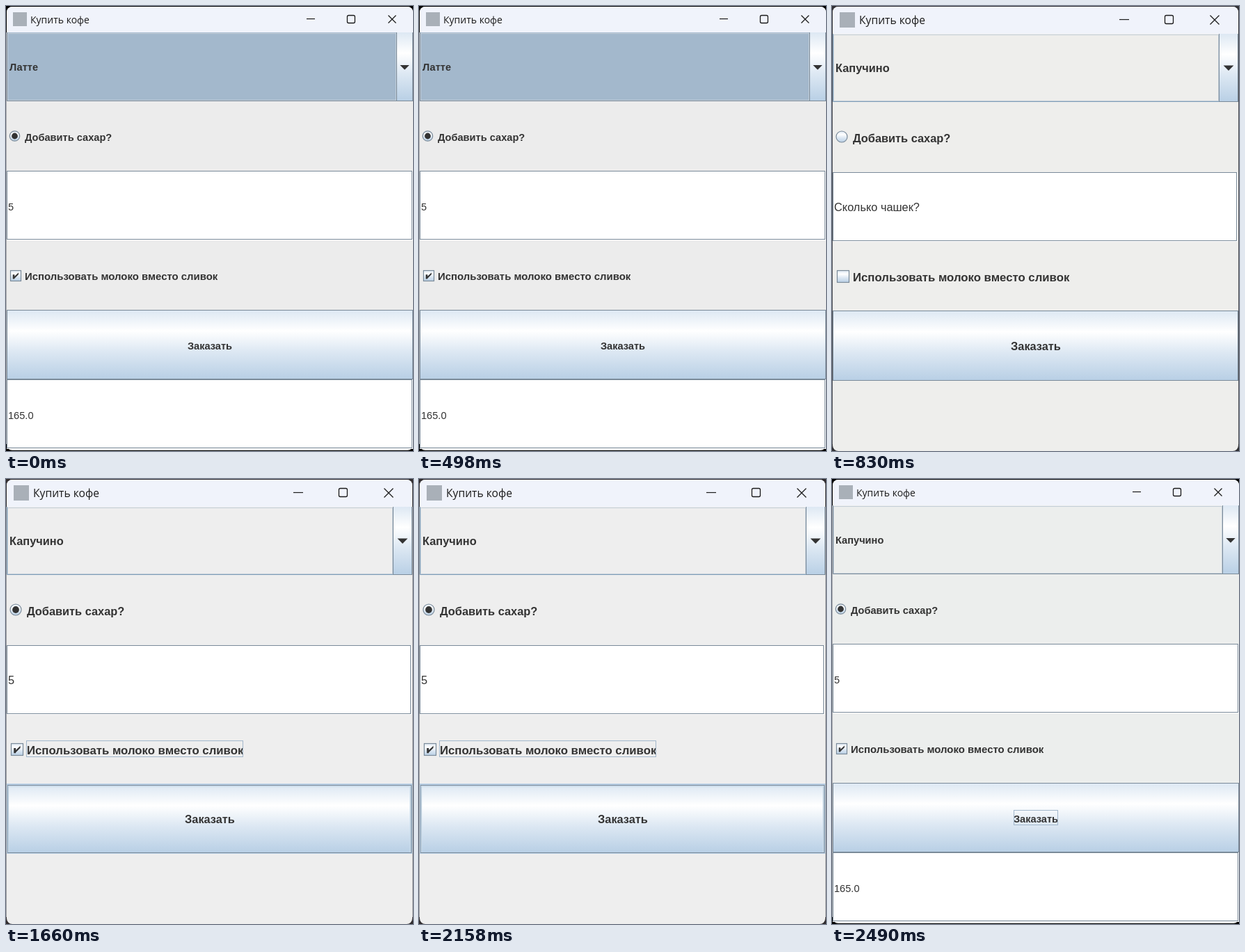
An HTML page that plays this animation: 585 by 640 pixels, repeating every 3.32 s.

```html
<!DOCTYPE html>
<html lang="ru">
<head>
<meta charset="utf-8">
<title>Купить кофе</title>
<style>
html, body { margin: 0; width: 100%; height: 100%; overflow: hidden; background: #000; }
svg { display: block; width: 585px; height: 640px; }
text { font-family: "Liberation Sans", Arial, sans-serif; fill: #333; white-space: pre; }
.bold { font-weight: 700; }
.title { font-family: "Open Sans", "Noto Sans", sans-serif; fill: #1b1b1b; }
.view { visibility: hidden; animation: show 3320ms step-end infinite; }
@keyframes show { 0% { visibility: visible; } 25%, 100% { visibility: hidden; } }
</style>
</head>
<body>
<svg id="stage" viewBox="0 0 585 640">
  <defs>
    <linearGradient id="metal" x1="0" y1="0" x2="0" y2="1">
      <stop offset="0" stop-color="#dde8f3"/>
      <stop offset=".3" stop-color="#fff"/>
      <stop offset=".6" stop-color="#dde8f3"/>
      <stop offset="1" stop-color="#b8cfe5"/>
    </linearGradient>
  </defs>
</svg>
<script>
const EDGE = '#7a8a99', DARK = '#333', METAL = 'url(#metal)';

// Two window sizes: a wide one and a slightly enlarged one.
const WIDE = {
  font: 14.6, longFont: 14.93, title: [35, 24.5, 14], bar: 38, right: 585, bottom: 639,
  icon: [10, 9, 20], min: [432, 444, 18.5], max: [490.5, 13.5, 11], close: [549.5, 13.5, 11],
  combo: [1, 38, 584, 99], split: 561, arrow: [573, 85, 6.7], line: EDGE,
  field: [1, 237, 583, 99], total: [1, 537, 583, 99], button: [1, 437, 584, 100],
  radio: [12.5, 187, 7.2], box: [6, 380, 15], textX: 27, middle: 293,
  lines: [93, 194, 294, 394, 494, 594]
};
const ZOOM = {
  font: 16.35, longFont: 16.75, title: [39, 26, 15.65], bar: 40, right: 584, bottom: 640,
  icon: [11, 9, 22], min: [413, 427, 19.5], max: [478.5, 13.5, 12], close: [543.5, 13.5, 13],
  combo: [1, 40, 583, 98], split: 556, arrow: [570, 85.5, 7.4], line: '#7f9db9',
  field: [1, 239, 581, 99], button: [1, 438, 583, 101],
  radio: [14, 188, 8], box: [7, 380, 17], textX: 30, middle: 293,
  lines: [95, 195.5, 295, 395.5, 495]
};

const ORDERED = { ...WIDE, sugar: true, milk: true, cups: '5', sum: '165.0' };
const views = [
  { ...ORDERED, drink: 'Латте', body: '#ececec', desk: '#000', side: '#aaacb0', pick: '#a3b8cc' },
  { ...ZOOM, drink: 'Капучино', cups: 'Сколько чашек?', body: '#eeeeec', desk: '#303034', side: '#505258' },
  { ...ZOOM, drink: 'Капучино', cups: '5', sugar: true, milk: true, hover: true,
    focus: [29.5, 376.5, 311, 23], body: '#eee', desk: '#302c2e', side: '#9a9ca0' },
  { ...ORDERED, drink: 'Капучино', body: '#eceeed', desk: '#000', side: '#aaacb0',
    focus: [261.5, 476.5, 63, 21] }
];

const rect = (x, y, w, h, fill, more = '') =>
  `<rect x="${x}" y="${y}" width="${w}" height="${h}" fill="${fill}" ${more}/>`;
const frame = (x, y, w, h, fill, stroke) =>
  rect(x + .5, y + .5, w - 1, h - 1, fill, `stroke="${stroke}"`);
const path = (d, stroke, width = 1) =>
  `<path d="${d}" fill="none" stroke="${stroke}" stroke-width="${width}"/>`;
const text = (s, x, y, size, cls = '', more = '') =>
  `<text class="${cls}" x="${x}" y="${y}" font-size="${size}" ${more}>${s}</text>`;

function titleBar(v) {
  const [ix, iy, is] = v.icon, [m0, m1, my] = v.min, [bx, by, bs] = v.max, [cx, cy, cs] = v.close;
  return rect(1, 1, v.right - 1, v.bottom - 1, v.body, 'rx="8"')
    + `<path d="M1 ${v.bar}V9a8 8 0 0 1 8-8H${v.right - 8}a8 8 0 0 1 8 8V${v.bar}z" fill="#f0f3fb"/>`
    + rect(ix, iy, is, is, '#a9b0b8')
    + text('Купить кофе', ...v.title, 'title')
    + path(`M${m0} ${my}H${m1}`, '#1b1b1b', 1.2)
    + rect(bx, by, bs, bs, 'none', 'rx="2" stroke="#1b1b1b" stroke-width="1.3"')
    + path(`M${cx} ${cy}l${cs} ${cs}m0 ${-cs}l${-cs} ${cs}`, '#1b1b1b', 1.3);
}

function combo(v) {
  const [x, y, w, h] = v.combo, [ax, ay, r] = v.arrow;
  const end = x + w, base = y + h - .5;
  return rect(x, y, w, h, v.pick || v.body)
    + frame(x + 1, y + 1, v.split - x - 1, h - 2, 'none', '#c3ced8')
    + rect(v.split, y, end - v.split, h, METAL)
    + path(`M${x + .5} ${y}V${base}H${end}`, v.line)
    + path(`M${v.split + .5} ${y}V${base}H${end - .5}V${y}`, EDGE)
    + `<path d="M${ax - r} ${ay}h${2 * r}l${-r} ${r}z" fill="${DARK}"/>`
    + text(v.drink, 5, v.lines[0], v.font, 'bold');
}

function field([x, y, w, h], s, base, size) {
  return rect(x, y, w + 1, h + 1, '#fff') + frame(x, y, w, h, '#fff', EDGE) + text(s, 3, base, size);
}

function radio(v) {
  const [x, y, r] = v.radio;
  return `<circle cx="${x}" cy="${y}" r="${r}" fill="${METAL}" stroke="${EDGE}" stroke-width="1.2"/>`
    + (v.sugar ? `<circle cx="${x}" cy="${y}" r="${r * .61}" fill="${DARK}"/>` : '')
    + text('Добавить сахар?', v.textX, v.lines[1], v.font, 'bold');
}

function check(v) {
  const [x, y, s] = v.box, k = s / 12;
  const mark = `<path transform="translate(${x} ${y}) scale(${k})" d="M3 5h2v2l4.6-4.3v2L5 9.3v.7H3z" fill="${DARK}"/>`;
  return rect(x + .5, y + .5, s, s, METAL, `stroke="${EDGE}" stroke-width="1.2"`)
    + (v.milk ? mark : '')
    + text('Использовать молоко вместо сливок', v.textX, v.lines[3], v.longFont, 'bold');
}

function button(v) {
  const [x, y, w, h] = v.button;
  const face = v.hover
    ? rect(x, y, w, h, '#b8cfe5') + frame(x + 1, y + 2, w - 2, h - 3, METAL, EDGE)
      + path(`M${x + 2.5} ${y + h - 2}V${y + 4}H${x + w - 3}V${y + h - 2}`, '#c8dae9', 1.5)
    : frame(x, y, w, h, METAL, EDGE);
  return face + text('Заказать', v.middle, v.lines[4], v.font, 'bold', 'text-anchor="middle"');
}

function draw(v, i) {
  const parts = [
    rect(0, 0, 585, 640, v.desk),
    rect(0, v.bar, 1, 630 - v.bar, v.side),
    rect(584, v.bar, 1, 630 - v.bar, v.side),
    titleBar(v), combo(v), radio(v),
    field(v.field, v.cups, v.lines[2], v.font),
    check(v), button(v),
    v.sum ? field(v.total, v.sum, v.lines[5], v.font) : '',
    v.focus ? rect(...v.focus, 'none', 'stroke="#a3b8cc"') : ''
  ];
  return `<g class="view" style="animation-delay:${i * 830 - 3320}ms">${parts.join('')}</g>`;
}

document.getElementById('stage').insertAdjacentHTML('beforeend', views.map(draw).join(''));
</script>
</body>
</html>
```
